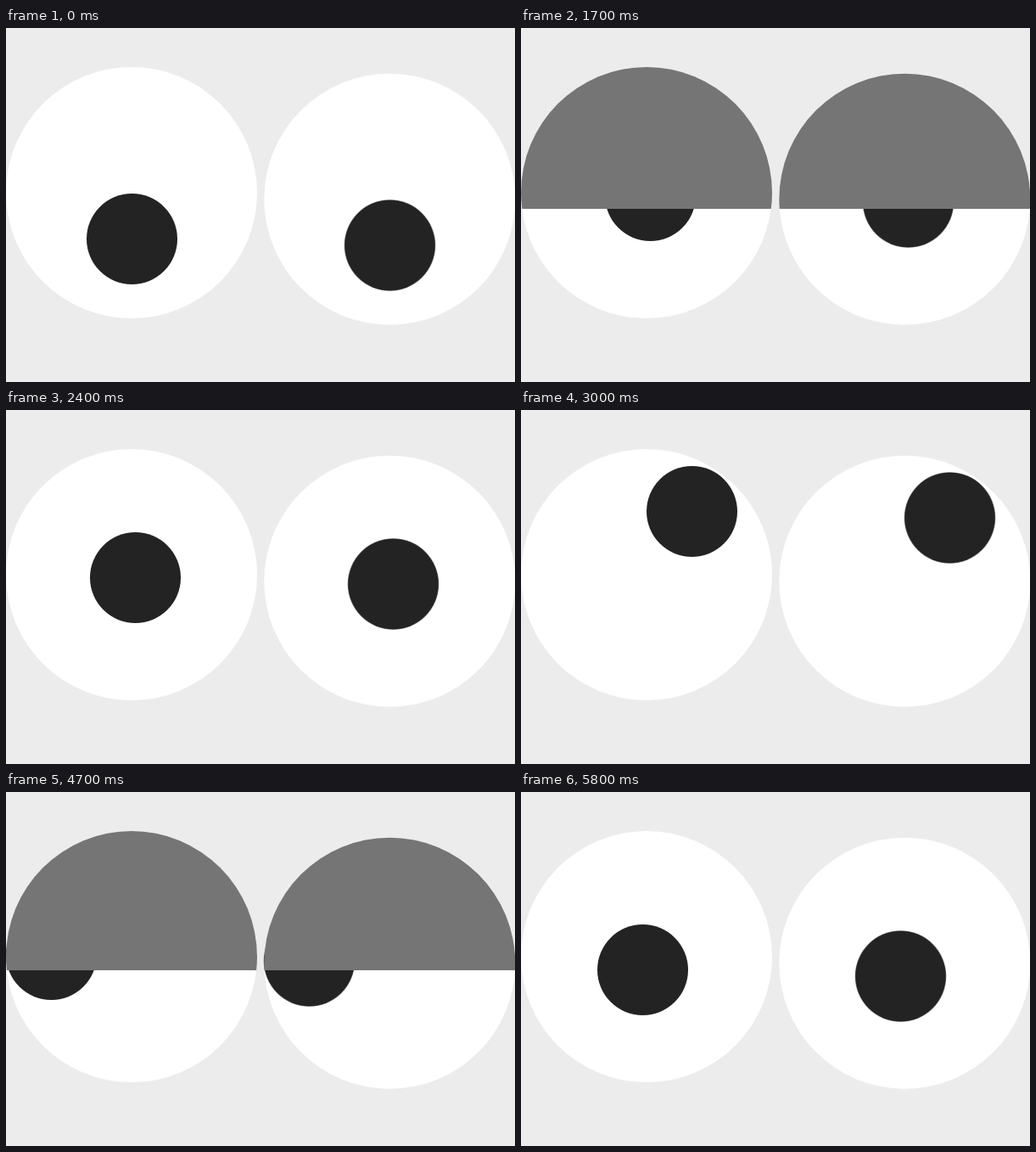
Recreate the animation shown at these times as an HTML page with a canvas. Size 600x417 px, loop 8 s.

```html
<!DOCTYPE html>
<html lang="en">
<head>
<meta charset="utf-8">
<title>Googly eyes</title>
<style>
  html, body { margin: 0; width: 100%; height: 100%; overflow: hidden; background: #ececec; }
  canvas { display: block; }
</style>
</head>
<body>
<canvas id="stage" width="600" height="417"></canvas>
<script>
const ctx = document.getElementById('stage').getContext('2d');
const W = 600, H = 417, LOOP = 8000, STEP = 100;
const EYE_R = 148, PUPIL_R = 53.5;
const LOOK_MS = 600, LID_MS = 400, LID_DROP = 420;

const left = { x: 148, y: 194 };
const right = { x: 452.3, y: 201.7 };
const gap = { x: 304, y: 7.5 };

// Where the left pupil glides to, and when it sets off
const rest = { x: 152.5, y: 171.5 };
const looks = [
  { at: -400, x: 146.5, y: 287 },
  { at: 1200, x: 151.5, y: 270.5, ms: 0 },
  { at: 1200, x: 152.5, y: 197.5, ms: 300 },
  { at: 2400, x: 201.5, y: 119.5 },
  { at: 3900, x: 53.5, y: 191.5 },
  { at: 5200, x: 143.5, y: 209.5 }
];
const blinks = [{ from: 1497, to: 2400 }, { from: 4500, to: 5300 }];

function ramp(t, from, ms) {
  if (t < from) return 0;
  return t >= from + ms ? 1 : (t - from) / ms;
}

function pupilAt(t) {
  return looks.reduce((pos, look) => {
    const p = ramp(t, look.at, look.ms ?? LOOK_MS);
    return { x: pos.x + (look.x - pos.x) * p, y: pos.y + (look.y - pos.y) * p };
  }, rest);
}

function lidAt(t) {
  const shut = blinks.map(b => Math.min(ramp(t, b.from, LID_MS), 1 - ramp(t, b.to - LID_MS, LID_MS)));
  return Math.round(LID_DROP * Math.max(...shut));
}

function disc(x, y, r, color) {
  ctx.beginPath();
  ctx.arc(x, y, r, 0, Math.PI * 2);
  ctx.fillStyle = color;
  ctx.fill();
}

function drawLids(edge) {
  ctx.save();
  ctx.beginPath();
  ctx.rect(0, 0, W, edge);
  ctx.clip();
  for (const eye of [left, right]) disc(eye.x, eye.y, EYE_R, '#757575');
  ctx.restore();
}

function draw(t) {
  ctx.fillStyle = '#ececec';
  ctx.fillRect(0, 0, W, H);
  for (const eye of [left, right]) disc(eye.x, eye.y, EYE_R, '#fff');

  const { x, y } = pupilAt(t);
  disc(x, y, PUPIL_R, '#232323');
  disc(x + gap.x, y + gap.y, PUPIL_R + 0.3, '#777');
  disc(x + gap.x, y + gap.y, PUPIL_R - 0.3, '#232323');
  drawLids(lidAt(t));
}

const start = performance.now();
function tick() {
  const t = (performance.now() - start) % LOOP;
  draw(Math.floor(t / STEP) * STEP);
  requestAnimationFrame(tick);
}
tick();
</script>
</body>
</html>
```
